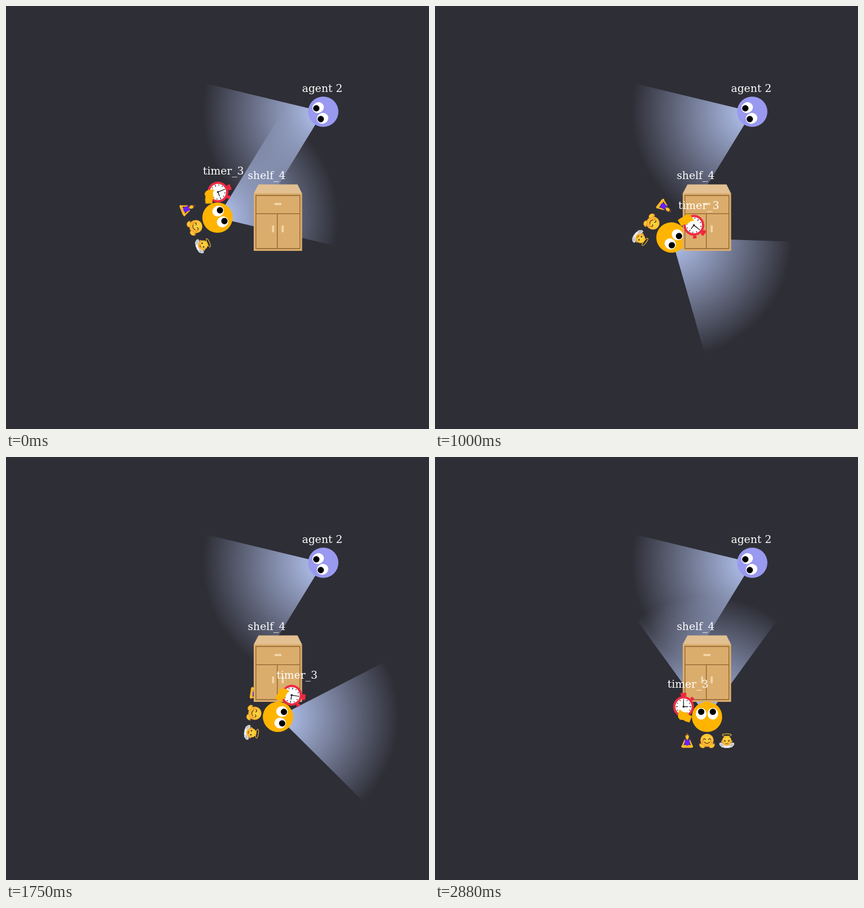
An HTML page that plays this animation: 748 px wide and 748 px high, repeating every 3290 ms.

```html
<!DOCTYPE html>
<html lang="en">
<head>
<meta charset="utf-8">
<title>Agents and a timer</title>
<style>
  html, body { margin: 0; width: 100%; height: 100%; overflow: hidden; background: #2e2e36; }
  svg { display: block; width: 100vw; height: 100vh; }
  text { font: 18.7px "DejaVu Serif", "Noto Serif", serif; fill: #fff; }
</style>
</head>
<body>
<svg viewBox="0 0 748 748">
  <defs>
    <radialGradient id="light" gradientUnits="userSpaceOnUse" cx="0" cy="0" r="213.7">
      <stop offset="0" stop-color="#b8c8f5"/>
      <stop offset="1" stop-color="#b8c8f5" stop-opacity="0"/>
    </radialGradient>
    <radialGradient id="skin" cy=".4" r=".6">
      <stop offset="0" stop-color="#fdd640"/>
      <stop offset=".6" stop-color="#fcc337"/>
      <stop offset="1" stop-color="#f5a52c"/>
    </radialGradient>
    <path id="cone" fill="url(#light)"/>
    <g id="eyes">
      <g id="eye">
        <ellipse cx="-10.3" cy="-5.5" rx="9.4" ry="10.3" fill="#fff"/>
        <circle cx="-10.3" cy="-9" r="5.6"/>
      </g>
      <use href="#eye" x="20.6"/>
    </g>
  </defs>

  <use href="#cone" transform="translate(561 187) rotate(247.5)"/>
  <use href="#cone" class="body"/>

  <g class="body">
    <circle r="26.8" fill="#ffb400"/>
    <use href="#eyes"/>

    <g id="lotus" transform="translate(-35 42.5)">
      <circle cy="-12" r="2" fill="#6d4534"/>
      <ellipse cy="-7.8" rx="3.8" ry="4.2" fill="#6d4534"/>
      <ellipse cy="-7" rx="2.8" ry="3.5" fill="#fcc02e"/>
      <path d="M-4-1.5L-8 8M4-1.5L8 8" stroke="#fcb52c" stroke-width="2.6" stroke-linecap="round"/>
      <path d="M-1.3-4h2.6v2h-2.6z" fill="#f5a82a"/>
      <path d="M-4.5-2.5Q0-1 4.5-2.5L4 8Q0 10-4 8Z" fill="#651fff"/>
      <path d="M-10.5 9Q-5 6 0 8.5Q5 6 10.5 9Q11 12 7 12.3H-7Q-11 12-10.5 9Z" fill="#fcc02e"/>
      <path d="M-6 9.5Q0 12 6 9.5" fill="none" stroke="#e59600" stroke-width=".8"/>
    </g>

    <g id="hug" transform="translate(0 42.5)">
      <circle cy="-1" r="11.6" fill="url(#skin)"/>
      <path d="M-6.7-2.2q2.2-3.2 4.4 0M2.3-2.2q2.2-3.2 4.4 0" fill="none" stroke="#422b0d" stroke-width="1.2" stroke-linecap="round"/>
      <path d="M-4.7 2.2Q0 6.5 4.7 2.2" fill="none" stroke="#6b3a0d" stroke-width="1.3" stroke-linecap="round"/>
      <circle cx="-7.5" cy="1" r="2" fill="#ff7a2a" opacity=".5"/>
      <circle cx="7.5" cy="1" r="2" fill="#ff7a2a" opacity=".5"/>
      <g id="palm">
        <path d="M-13 4.5L-10.5 6.5L-10.7 3.6Q-8.8 3.3-8.2 6Q-4.5 6.5-3.5 9.5Q-4 12.8-8 12.5Q-12 12-13.3 8Z" fill="#fcc438" stroke="#e59a20" stroke-width=".8"/>
      </g>
      <use href="#palm" transform="scale(-1 1)"/>
    </g>

    <g id="cherub" transform="translate(35 42.5)">
      <g id="wing">
        <path d="M-3 6Q-9 1.5-13 3.5Q-14 8-11 9Q-10 12-7 11.5Q-5 13.5-3 10Z" fill="#d3d6d9"/>
        <path d="M-12 5.5l4 2M-9.5 9l3-1.2" stroke="#9da3a8" stroke-width=".8"/>
      </g>
      <use href="#wing" transform="scale(-1 1)"/>
      <path d="M-5 7Q0 4 5 7L4.5 12.5H-4.5Z" fill="#eceff1"/>
      <circle cx="-8.3" cy="1" r="1.8" fill="#f0a52d"/>
      <circle cx="8.3" cy="1" r="1.8" fill="#f0a52d"/>
      <ellipse rx="8.2" ry="8.8" fill="url(#skin)"/>
      <path d="M-7.5-3Q-4-9.5 0-9Q5-9 7.5-3Q3-4 1-7Q-2-4-7.5-3Z" fill="#ffca28"/>
      <circle cx="-3.5" cy="0" r="1.3" fill="#403018"/>
      <circle cx="3.5" cy="0" r="1.3" fill="#403018"/>
      <path d="M-2.4 4.2Q0 6.3 2.4 4.2" fill="none" stroke="#7d4312" stroke-width="1.1"/>
      <ellipse cy="-10.5" rx="8" ry="2.2" fill="none" stroke="#edb82f" stroke-width="1.2"/>
    </g>
  </g>

  <g transform="translate(561 187)">
    <circle r="26.8" fill="#9999f0"/>
    <use href="#eyes" transform="rotate(247.5)"/>
  </g>

  <g id="shelf">
    <path d="M446.500 315.500H515.500L523.500 331.500H438Z" fill="#e2c092"/>
    <path d="M438 331h85.600v102H438z" fill="#dbad6d"/>
    <path d="M442 335h77.700v94H442zM442 367.300h77.700M479.700 367.300V429" fill="none" stroke="#8f622f" stroke-width="1.3"/>
    <g fill="#f3d6a6">
      <rect x="474.700" y="348.200" width="12.400" height="3.700" rx="1"/>
      <rect x="470.500" y="388" width="3.600" height="12.300" rx="1"/>
      <rect x="487.500" y="388" width="3.600" height="12.300" rx="1"/>
    </g>
  </g>

  <g class="body">
    <g id="watch" transform="translate(-41.5 -18)">
      <path d="M-2.500-21h5v5h-5z" fill="#c62035"/>
      <rect x="-5" y="-24.500" width="10" height="5.800" rx="1.200" fill="#f0283f"/>
      <g transform="rotate(48)" fill="#f0283f">
        <path d="M-1.500-20h3v4h-3z"/>
        <rect x="-3.200" y="-23.500" width="6.400" height="4.600" rx="1"/>
      </g>
      <circle r="16.400" fill="#fff" stroke="#ee2b42" stroke-width="4"/>
      <g id="ticks" stroke="#222" stroke-width="1.300"></g>
      <path d="M0 1V-9.500M-1 0H7.500" stroke="#222" stroke-width="1.400" stroke-linecap="round"/>
      <circle r="1.700" fill="#222"/>
    </g>
    <path id="fist" fill="#ffb400" d="M-31 10L-26.500-1.500L-32-3.500L-34-7L-39-8L-44-9.500L-47.500-13Q-50-12-50-7L-51.500-4L-51 1L-48 5L-42 5.500L-38 8Z"/>
  </g>

  <text x="523.500" y="151.500">agent 2</text>
  <text x="427.500" y="306.200">shelf_4</text>
  <text id="timerLabel">timer_3</text>
</svg>
<script>
const LOOP = 3290, FPS = 24, RAD = Math.PI / 180;
const HALF_VIEW = 36, REACH = 213.7;
const START = { x: 374, y: 374.2 }, END = { x: 481, y: 459.5 };
const START_TURN = 67.5, TRAVEL_TURN = 128;
const HELD = { x: -40.7, y: -20.7 }, LABEL = { x: -29.3, y: -30.6 };

const bodies = document.querySelectorAll('.body');
const timerLabel = document.getElementById('timerLabel');
const ramp = (v, from, to) => Math.min(1, Math.max(0, (v - from) / (to - from)));
const mix = (a, b, p) => a + (b - a) * p;

const coneX = REACH * Math.sin(HALF_VIEW * RAD), coneY = -REACH * Math.cos(HALF_VIEW * RAD);
document.getElementById('cone').setAttribute('d',
  `M0 0L${-coneX} ${coneY}A${REACH} ${REACH} 0 0 1 ${coneX} ${coneY}Z`);

document.getElementById('ticks').innerHTML = Array.from({ length: 12 }, (_, i) =>
  `<path d="M0-13.500v${i % 3 ? 2 : 3.2}" transform="rotate(${i * 30})"/>`).join('');

function draw(ms) {
  // Delays are whole hundredths of a second, nearest to 24 steps per second.
  const step = Math.floor((Math.floor(ms / 10) * 10 + 4.9) * FPS / 1000);
  const move = ramp(step, 17, 34);
  const x = mix(START.x, END.x, move), y = mix(START.y, END.y, move);
  const turn = mix(START_TURN, TRAVEL_TURN, ramp(step, 2, 17)) - TRAVEL_TURN * ramp(step, 34, 69);
  const c = Math.cos(turn * RAD), s = Math.sin(turn * RAD);

  for (const body of bodies) body.setAttribute('transform', `translate(${x} ${y}) rotate(${turn})`);
  timerLabel.setAttribute('x', x + LABEL.x + HELD.x * c - HELD.y * s);
  timerLabel.setAttribute('y', y + LABEL.y + HELD.x * s + HELD.y * c);
}

const begin = performance.now();
function tick() {
  draw((performance.now() - begin) % LOOP);
  requestAnimationFrame(tick);
}
tick();
</script>
</body>
</html>
```
